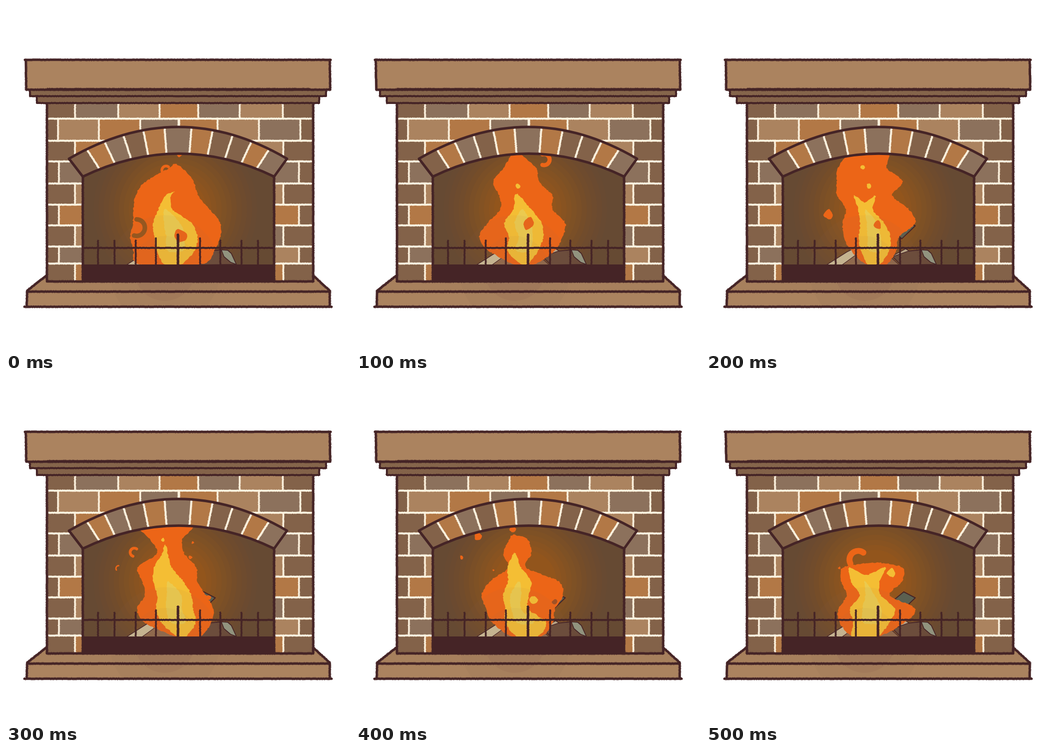
Recreate the animation shown at these times as an HTML page with a canvas. Size 748 by 748 pixels, loop 0.6 s.

```html
<!DOCTYPE html>
<html lang="en">
<head>
<meta charset="utf-8">
<title>Fireplace</title>
<style>
html, body { margin: 0; width: 100%; height: 100%; overflow: hidden; background: #fff; }
canvas { display: block; width: 748px; height: 748px; }
</style>
</head>
<body>
<canvas id="stage" width="748" height="748"></canvas>
<script>
const ctx = document.getElementById('stage').getContext('2d');
const INK = '#452426', MORTAR = '#fdf2de', TAN = '#ab835f', DARK = '#836249';
const BRICK = { T: TAN, D: DARK, G: '#8c715c', R: '#b27846' };
const ORANGE = '#ec6517', YELLOW = '#f4be34', PALE = '#ebca4f';
const STEP = 100, FLOOR = 562, RISE = 30;

let seed = 1;
const rnd = () => (seed = seed * 16807 % 2147483647) / 2147483647;
const parse = s => s.split(' ').map(p => p.split(',').map(Number));

function box(x0, y0, x1, y1, color) {
  ctx.fillStyle = color;
  ctx.fillRect(x0, y0, x1 - x0, y1 - y0);
}

function disc(x, y, r, color) {
  ctx.beginPath();
  ctx.arc(x, y, r, 0, Math.PI * 2);
  ctx.fillStyle = color;
  ctx.fill();
}

function poly(s, color, width) {
  ctx.beginPath();
  parse(s).forEach(([x, y]) => ctx.lineTo(x, y));
  ctx.closePath();
  ctx.fillStyle = color;
  ctx.fill();
  if (width) {
    ctx.strokeStyle = INK;
    ctx.lineWidth = width;
    ctx.stroke();
  }
}

// Brush line with a slightly grainy edge
function line(s, width = 5, color = INK) {
  const pts = parse(s);
  ctx.strokeStyle = ctx.fillStyle = color;
  ctx.lineWidth = width;
  ctx.beginPath();
  pts.forEach(([x, y]) => ctx.lineTo(x, y));
  ctx.stroke();
  for (let i = 1; i < pts.length; i++) {
    const [ax, ay] = pts[i - 1], dx = pts[i][0] - ax, dy = pts[i][1] - ay;
    const len = Math.hypot(dx, dy);
    for (let d = 0; d < len; d += 2.5) {
      const off = (rnd() < .5 ? -1 : 1) * (width / 2 + rnd() * .5);
      ctx.fillRect(ax + dx * d / len - dy / len * off - .6, ay + dy * d / len + dx / len * off - .6, 1.2, 1.2);
    }
  }
}

// Closed soft curve through points, with a ragged edge
function blob(p, color, rough = 2) {
  const n = p.length;
  ctx.beginPath();
  for (let i = 0; i < n; i++) {
    const a = p[(i + n - 1) % n], b = p[i], c = p[(i + 1) % n], d = p[(i + 2) % n];
    const count = Math.max(2, Math.round(Math.hypot(c[0] - b[0], c[1] - b[1]) / 3));
    for (let k = 0; k < count; k++) {
      const t = k / count, t2 = t * t, t3 = t2 * t;
      const [x, y] = [0, 1].map(j =>
        (2 * t3 - 3 * t2 + 1) * b[j] + (t3 - 2 * t2 + t) * (c[j] - a[j]) * .45 +
        (3 * t2 - 2 * t3) * c[j] + (t3 - t2) * (d[j] - b[j]) * .45 + (rnd() - .5) * rough);
      ctx.lineTo(x, y);
    }
  }
  ctx.fillStyle = color;
  ctx.fill();
}

function spark(x, y, r, color = ORANGE) {
  const pts = [];
  for (let a = 0; a < 6; a++) {
    const d = r * (.7 + rnd() * .6);
    pts.push([x + d * Math.cos(a), y + d * Math.sin(a)]);
  }
  blob(pts, color, 1);
}

function curl(x, y, r, from, to, width, color = ORANGE) {
  ctx.beginPath();
  ctx.arc(x, y, r, from * Math.PI, to * Math.PI);
  ctx.strokeStyle = color;
  ctx.lineWidth = width;
  ctx.stroke();
}

function wall() {
  const row = (y0, y1, edges, keys) => [...keys].forEach((k, i) => {
    box(edges[i], y0, edges[i + 1], y1, BRICK[k]);
    if (i) line(`${edges[i]},${y0} ${edges[i]},${y1}`, 3.6, MORTAR);
  });
  const courses = [245, 293, 338, 386, 432, 477, 523, 560, 598];
  box(89, 211, 668, 599, DARK);
  row(211, 245, [92, 150, 244, 334, 418, 508, 602, 665], 'DGTRGTD');
  row(245, 293, [92, 113, 202, 292, 376, 460, 550, 640, 665], 'DTRGRTGD');
  for (let i = 1; i < 8; i++) {
    const [l, r] = i % 2 ? [150, 603] : [115, 637];
    row(courses[i], courses[i + 1], [92, l, 375, r, 665], 'D' + 'RGTRTGR'[i - 1] + 'TGTRGTR'[i - 1] + 'D');
  }
  line('376,245 376,264', 5, MORTAR);
  courses.slice(0, -1).forEach(y => line(`93,${y} 664,${y}`, 3.8, MORTAR));
}

function logs() {
  poly('402,488 430,465 455,478 426,506', '#5b6050', 2.2);
  poly('262,563 306,535 340,518 330,540 296,563', '#cdbd98', 1.6);
  poly('296,563 330,538 400,545 420,563', '#8f694d', 1.2);
  poly('408,542 434,528 444,534 412,548', '#bba989', 1.6);
  poly('406,545 440,533 468,530 500,562 424,563', '#6a4b3a', 1.8);
  poly('468,530 482,531 490,538 501,562 488,557 474,545', '#91937e', 1.8);
}

// Each pair is the left and right edge, one RISE apart from the floor up; the last entry is the tip
const bodies = [
  '291,425 277,453 270,466 276,466 277,443 282,418 303,408 356,383 366,343',
  '345,388 288,432 268,449 286,455 314,427 311,427 298,398 321,392 338,357 347,316',
  '350,392 315,414 300,419 297,455 304,441 285,405 284,428 287,393 312,398 360,314',
  '370,422 302,446 285,451 302,434 296,416 286,414 328,388 314,383 285,406 340,314',
  '340,402 296,428 283,433 273,450 292,440 331,370 320,381 333,374 341,341',
  '320,375 290,432 288,455 306,400 294,427 299,426 370,402'
];
const cores = [
  '345,380 328,410 322,416 320,404 331,362 348,358 367,404',
  '360,373 329,396 333,407 322,404 343,381 344,354 349,408',
  '352,378 337,398 332,401 335,387 331,363 321,369 345,427',
  '372,392 338,412 326,407 329,403 320,385 322,360 339,352 346,362',
  '350,395 325,413 324,374 320,376 330,381 330,359 342,347 344,380',
  '318,372 320,398 313,411 334,380 315,377 312,390 348,428'
];
// Loose sparks, curls and gaps around each pose
const details = [
  () => {
    curl(284, 482, 18, -.5, .6, 10, '#97561d');
    curl(348, 357, 9, .7, 1.7, 6);
    spark(378, 323, 5);
    spark(382, 498, 13);
  },
  () => {
    curl(409, 334, 12, -.6, .6, 9);
    spark(376, 473, 13);
    spark(353, 391, 5, YELLOW);
  },
  () => {
    spark(264, 454, 10);
    spark(373, 476, 8);
    spark(341, 351, 5, YELLOW);
    spark(354, 392, 5, YELLOW);
  },
  () => {
    curl(279, 379, 9, .6, 1.7, 6);
    curl(245, 414, 6, .8, 1.5, 3);
    spark(406, 358, 3);
    spark(401, 390, 4);
    spark(440, 477, 5);
    spark(341, 352, 4, YELLOW);
  },
  () => {
    spark(264, 343, 8);
    spark(230, 390, 4);
    spark(342, 328, 7);
    spark(299, 418, 2);
    spark(386, 482, 8, YELLOW);
    spark(432, 486, 5, '#a05226');
  },
  () => {
    curl(331, 395, 19, .85, 1.7, 13);
    spark(290, 413, 3);
    spark(401, 424, 9, YELLOW);
  }
];

const outline = (rows, base = FLOOR) => {
  const tip = rows[rows.length - 1], sides = rows.slice(0, -1);
  const edge = side => sides.map((r, i) => [r[side], base - i * RISE]);
  return [...edge(0), tip, ...edge(1).reverse()];
};

function flame(i) {
  const core = parse(cores[i]);
  const heart = core.slice(1, 5).map(([l, r]) => [l + (r - l) * .28, r - (r - l) * .3]);
  const [l, r] = heart[3];
  heart[3] = [(l + r) / 2, FLOOR - 4 * RISE];
  blob(outline(parse(bodies[i])), ORANGE, 2.5);
  blob(outline(core), YELLOW, 2.5);
  blob(outline(heart, FLOOR - RISE), PALE);
  details[i]();
}

function interior(i) {
  ctx.save();
  ctx.beginPath();
  ctx.moveTo(167, FLOOR);
  ctx.lineTo(167, 371);
  ctx.quadraticCurveTo(376, 271, 583, 371);
  ctx.lineTo(583, FLOOR);
  ctx.clip();
  box(160, 300, 590, 570, '#664a33');
  for (let k = 0; k < 11; k++) disc(368, 442, 178 - k * 11, `rgba(180,98,14,${.025 + k * .009})`);
  logs();
  flame(i);
  disc(345, 575, 120, 'rgba(140,105,80,.06)');
  disc(345, 575, 75, 'rgba(140,105,80,.06)');
  ctx.restore();
}

function arch() {
  const mid = 374;
  const top = x => 263 + 69 * ((x - mid) / 237) ** 2;
  const low = x => 321 + 50 * ((x - mid) / 208) ** 2;
  const joints = [];
  for (let k = 0; k < 5; k++) {
    const off = 29 + 47 * k - 1.2 * k * k;
    joints.unshift(-off);
    joints.push(off);
  }
  const ends = [-260, ...joints, 260];
  const upper = d => `${mid + d * 1.03},${top(mid + d) - 8}`;
  const lower = d => `${mid + d * .85},${low(mid + d * .86) + 4}`;
  const shape = () => {
    ctx.beginPath();
    ctx.moveTo(137, 332);
    ctx.quadraticCurveTo(375, 194, 611, 332);
    ctx.lineTo(583, 371);
    ctx.quadraticCurveTo(376, 271, 167, 371);
    ctx.closePath();
  };
  ctx.save();
  shape();
  ctx.clip();
  [...'DRGDRGRDDRG'].forEach((k, i) =>
    poly([upper(ends[i]), upper(ends[i + 1]), lower(ends[i + 1]), lower(ends[i])].join(' '), BRICK[k]));
  joints.forEach(d => line(`${upper(d)} ${lower(d)}`, 4, MORTAR));
  ctx.restore();
  shape();
  ctx.strokeStyle = INK;
  ctx.lineWidth = 5.4;
  ctx.stroke();
}

function hearth() {
  poly('89,586 45,621 705,621 669,587', '#a7805d');
  box(45, 621, 704, 654, TAN);
  ctx.save();
  ctx.beginPath();
  ctx.rect(45, 600, 660, 54);
  ctx.clip();
  disc(345, 575, 120, 'rgba(140,105,80,.12)');
  disc(345, 575, 66, 'rgba(140,98,80,.2)');
  ctx.restore();
}

function grate() {
  box(167, FLOOR, 583, 599, INK);
  line('170,526 581,526', 4);
  for (const d of [0, 48, 92, 138, 174]) {
    const y = 510 - 13 * Math.exp(-((d / 50) ** 2));
    for (const x of [374 - d, 374 + d]) line(`${x},${y} ${x},563`, d ? 3.6 : 4.6);
  }
}

function mantel() {
  box(67, 196, 681, 211, DARK);
  box(52, 182, 696, 196, '#85654b');
  box(43, 117, 705, 182, TAN);
  line('41,117 706,117');
  line('43,117 44,182 705,182 704,117');
  line('90,180 660,180', 3);
  line('52,183 52,196 696,196 696,183', 4);
  line('67,197 67,211 681,211 681,197', 4);
}

function draw(i) {
  seed = 77;
  ctx.lineCap = ctx.lineJoin = 'round';
  box(0, 0, 748, 748, '#fff');
  hearth();
  wall();
  interior(i);
  arch();
  line('167,371 167,599');
  line('583,371 583,599');
  grate();
  line('89,211 89,599 668,599 668,211');
  line('88,586 46,619 45,653');
  line('670,588 704,619 704,653');
  line('46,621 704,621');
  line('40,654 708,654');
  mantel();
}

let shown = -1;
function tick() {
  const i = Math.floor(performance.now() / STEP) % bodies.length;
  if (i !== shown) draw(shown = i);
  requestAnimationFrame(tick);
}
tick();
</script>
</body>
</html>
```
